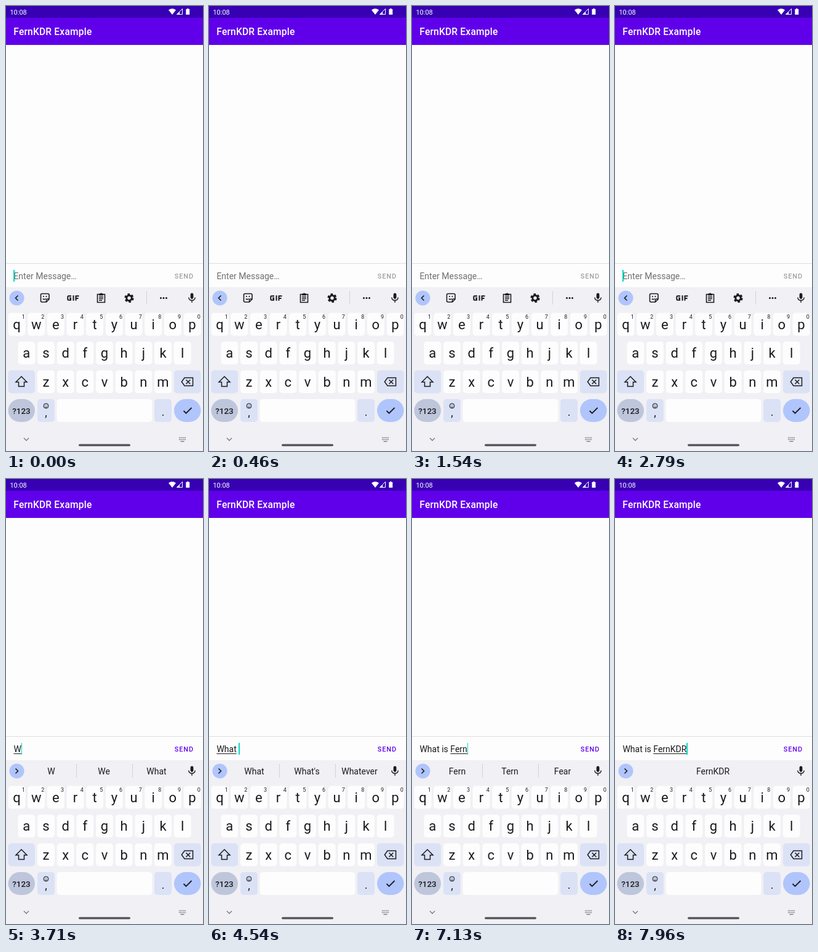
An HTML page for the animation above (8000 ms loop, 320x720 px).

```html
<!DOCTYPE html>
<html lang="en">
<head>
<meta charset="utf-8">
<title>Chat input</title>
<style>
  html, body { margin: 0; width: 100%; height: 100%; overflow: hidden; background: #fdfdfd; }
  #stage { position: relative; width: 320px; height: 720px; overflow: hidden; font-family: Roboto, sans-serif; }
  svg { position: absolute; inset: 0; }
  text { fill: #1b1b1f; }
  .mid { text-anchor: middle; }
  .letter { font-size: 22px; }
  .hint { font-size: 9px; }
  .key { fill: #fdfdfd; }
  .side { fill: #dbe2f6; }
  .blue { fill: #b0c5fc; }
  .line { fill: none; stroke: #1b1b1f; stroke-width: 1.6; }
  .solid { fill: #1b1b1f; }
  .rule { stroke: #d2d3da; }
  .word { font-size: 14px; }
  #send { font-size: 10.9px; font-weight: 500; letter-spacing: .97px; }
  #field { position: absolute; left: 12.4px; top: 427px; height: 20px; line-height: 20px; font-size: 14px; white-space: pre; color: #1b1b1f; }
  #comp { text-decoration: underline 1px; text-underline-offset: 1.5px; text-decoration-skip-ink: none; }
  #hold { position: absolute; left: 0; top: 0; color: #707070; }
  #caret { position: absolute; left: 100%; top: 0; width: 1.5px; height: 19px; background: #03dac5; }
</style>
</head>
<body>
<div id="stage">
  <svg width="320" height="720" viewBox="0 0 320 720">
    <rect width="320" height="720" fill="#fdfdfd"/>
    <rect width="320" height="63" fill="#6000ea"/>
    <rect width="320" height="19" fill="#3700b3"/>
    <text x="6.5" y="13.7" font-size="10.9" style="fill:#fff">10:08</text>
    <g fill="#fff">
      <path d="M264 6.6Q270 2 276 6.6L270 14Z"/>
      <path d="M286.5 4.5V13.5H277.5Z" fill="none" stroke="#fff"/>
      <path d="M282 9V14H277Z"/>
      <path d="M292.3 5H294V4H296.5V5H298.2V14H292.3Z"/>
    </g>
    <text x="12.3" y="47" font-size="15.57" font-weight="500" letter-spacing=".2" style="fill:#fff">FernKDR Example</text>

    <path d="M0 416.5H320" stroke="#dedede"/>
    <text id="send" x="273.7" y="440.5">SEND</text>

    <rect y="455" width="320" height="265" fill="#f0f0f5"/>
    <g id="keys"></g>

    <circle class="blue" cx="17.5" cy="472.5" r="12"/>
    <path id="arrow" class="line"/>
    <g id="tools">
      <path class="line" d="M58.5 465.5H68Q70 465.5 70 467.5V474.5L65.5 479H58.5Q56.5 479 56.5 477V467.5Q56.5 465.5 58.5 465.5ZM70 474H67Q65.5 474 65.5 475.5V479M60 473.5Q62 476 64.5 473.5"/>
      <circle class="solid" cx="61" cy="470" r="1.1"/>
      <circle class="solid" cx="65.5" cy="470" r="1.1"/>
      <path class="line" style="stroke-width:2" d="M106 469.3H101.5Q100.3 469.3 100.3 470.5V474.5Q100.3 475.7 101.5 475.7H105V472.5H103M109.5 468.3V476.7M113.5 476.7V469.3H118.5M113.5 473H117.5"/>
      <path class="line" d="M148.5 466.5H160.5V479.5H148.5ZM151 470.7H158M151 473.5H158M151 476.3H156"/>
      <path class="solid" d="M151 465.5H153Q154.5 463 156 465.5H158V468.5H151Z"/>
      <circle class="line" cx="200" cy="472.5" r="4.2" style="stroke-width:3"/>
      <circle class="line" cx="200" cy="472.5" r="6.3" style="stroke-width:2.6" stroke-dasharray="3.6 3"/>
      <path class="rule" d="M228.5 461V483"/>
      <g class="solid"><circle cx="251.5" cy="472.5" r="1.5"/><circle cx="256" cy="472.5" r="1.5"/><circle cx="260.5" cy="472.5" r="1.5"/></g>
    </g>
    <g id="bar">
      <path id="splits" class="rule" d="M114.5 461V483M205.5 461V483"/>
      <text class="mid word" x="73.5" y="478"></text>
      <text class="mid word" x="159" y="478"></text>
      <text class="mid word" x="244.5" y="478"></text>
    </g>
    <rect class="solid" x="299.6" y="464.5" width="4.8" height="9.5" rx="2.4"/>
    <path class="line" style="stroke-width:1.4" d="M296.8 471.5Q297 476.3 302 476.3T307.2 471.5M302 476.3V480"/>

    <path class="line" style="stroke-width:1.5" d="M25 599.5L34 608.5H29.5V615.5H20.5V608.5H16Z"/>
    <path class="line" style="stroke-width:1.5" d="M290 601.5H303.5V614.5H290L285.3 608ZM292.5 604.7L299.3 611.5M299.3 604.7L292.5 611.5"/>
    <path class="line" style="stroke-width:1.8" d="M288.5 655L292.5 659L301.5 650"/>
    <text class="mid" x="25" y="659.5" font-size="13.5" font-weight="500">?123</text>
    <circle class="line" cx="65" cy="647" r="4" style="stroke-width:1"/>
    <path class="line" style="stroke-width:1" d="M62.8 648Q65 651 67.2 648M63 645.7H64.2M65.8 645.7H67"/>
    <text class="mid" x="65" y="664" font-size="18">,</text>
    <text class="mid" x="255" y="663" font-size="18">.</text>

    <path d="M29 699L33 703L37 699" fill="none" stroke="#75767c" stroke-width="1.3"/>
    <rect x="118" y="708.7" width="84" height="3.6" rx="1.8" fill="#56575c"/>
    <path d="M281 698.5H292M281 701.5H292" stroke="#75767c" stroke-width="1.5" stroke-dasharray="1.5 .9"/>
    <path d="M283.5 704.5H289.5" stroke="#75767c" stroke-width="1.3"/>
  </svg>
  <div id="field"><span id="hold">Enter Message…</span><span id="done"></span><span id="comp"></span><i id="caret"></i></div>
</div>
<script>
const LOOP = 8000;
const $ = id => document.getElementById(id);
const labels = document.querySelectorAll('#bar text');

// Keyboard
const box = (cls, x, y, w, r = 5) =>
  `<rect class="${cls}" x="${x}" y="${y}" width="${w}" height="37" rx="${r}"/>`;
const row = (letters, first, y, hints) => [...letters].map((c, i) => {
  const x = first + i * 31.67;
  return box('key', x - 14, y, 28) +
    `<text class="mid letter" x="${x}" y="${y + 26}">${c}</text>` +
    (hints ? `<text class="mid hint" x="${x + 10.7}" y="506">${(i + 1) % 10}</text>` : '');
}).join('');
$('keys').innerHTML =
  row('qwertyuiop', 17.5, 496.5, true) + row('asdfghjkl', 33.3, 543) + row('zxcvbnm', 65, 589.5) +
  box('side', 3.5, 589.5, 43.5) + box('side', 273, 589.5, 43.5) +
  box('side', 51, 636, 28) + box('key', 82.5, 636, 155) + box('side', 241, 636, 28) +
  box('blue', 273, 636, 43.5, 18.5) +
  '<rect x="3.5" y="636" width="43.5" height="37" rx="18.5" fill="#bec6dc"/>';

// Time, finished text, word being composed, suggestions
const steps = [
  [0, '', '', ''],
  [3630, '', 'W', 'W We What'],
  [3800, '', 'Wh', 'Wh What Who'],
  [4000, '', 'Wha', "Wha What What's"],
  [4210, '', 'What', "What What's Whatever"],
  [4420, '', 'What ', "What What's Whatever"],
  [4790, 'What ', '', 'is are the'],
  [4960, 'What ', 'i', 'i I is'],
  [5130, 'What ', 'is', 'is its in'],
  [5330, 'What is ', '', 'the your a'],
  [5500, 'What is ', 'F', 'F For f'],
  [5750, 'What is ', 'Fe', 'Fe Few F'],
  [5960, 'What is ', 'Fer', 'Fer Her For'],
  [6120, 'What is ', 'Fern', 'Fern Tern Fear'],
  [7380, 'What is ', 'FernK', 'FernK Ferns Fernlike'],
  [7580, 'What is ', 'FernKD', ' FernKD '],
  [7790, 'What is ', 'FernKDR', ' FernKDR ']
];

let shown = -1;
function show(n) {
  if (n === shown) return;
  shown = n;
  const [, done, comp, list] = steps[n];
  const typing = n > 0;
  const words = list.split(' ');
  const word = comp.trimEnd();
  $('done').textContent = done;
  $('comp').textContent = word;
  $('caret').style.marginLeft = (comp.length - word.length) * 3.5 + 'px';
  $('hold').style.display = typing ? 'none' : '';
  $('send').style.fill = typing ? '#6200ee' : '#a0a0a0';
  $('arrow').setAttribute('d', typing ? 'M15.5 468.5L19.5 472.5L15.5 476.5' : 'M19.5 468.5L15.5 472.5L19.5 476.5');
  $('tools').style.display = typing ? 'none' : '';
  $('bar').style.display = typing ? '' : 'none';
  $('splits').style.display = words[0] ? '' : 'none';
  labels.forEach((el, i) => el.textContent = words[i] || '');
}

// The caret restarts its blink whenever the text changes
function blinkStart(n) {
  const text = i => steps[i][1] + steps[i][2];
  while (n > 0 && text(n) === text(n - 1)) n--;
  return n ? steps[n][0] : -215;
}

function draw() {
  const t = performance.now() % LOOP;
  const n = steps.filter(s => s[0] <= t).length - 1;
  show(n);
  $('caret').style.opacity = (t - blinkStart(n)) % 1000 < 500 ? 1 : 0;
  requestAnimationFrame(draw);
}
draw();
</script>
</body>
</html>
```
